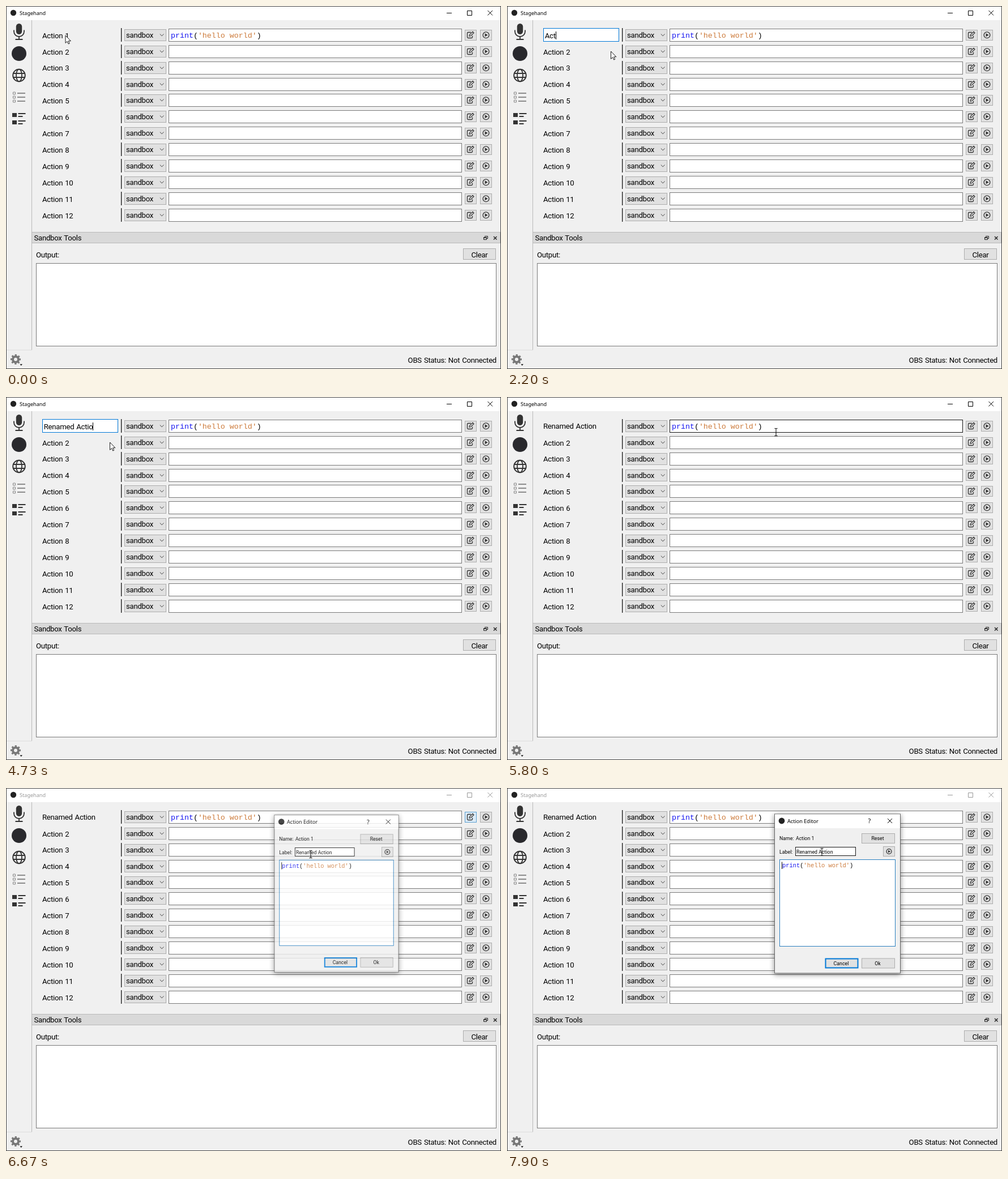
An HTML page that plays this animation: 874x641 px, repeating every 8000 ms.

```html
<!DOCTYPE html>
<html lang="en">
<head>
<meta charset="utf-8">
<title>Stagehand</title>
<style>
html, body { margin: 0; width: 100%; height: 100%; overflow: hidden; background: #f0f0f0; }
svg { display: block; width: 874px; height: 641px; }
text { white-space: pre; fill: #000; }
.ui { font: 13.2px Roboto, sans-serif; letter-spacing: -.28px; word-spacing: 1px; }
.bar { font: 9.1px "Noto Sans", sans-serif; }
.small { font: 8.8px Roboto, sans-serif; }
.code { font: 13.3px "Liberation Mono", monospace; }
.code.tiny { font-size: 10.45px; }
</style>
</head>
<body>
<svg id="stage" viewBox="0 0 874 641" xmlns="http://www.w3.org/2000/svg"></svg>
<script>
const LOOP = 8000, OPEN = 6590, CLICK = 6500, PITCH = 28.93;
const BLUE = '#0078d7', GREY = '#adadad', FIELD = '#7a7a7a', DARK = '#333';
const stage = document.getElementById('stage');

function add(parent, tag, attrs, content) {
  const el = document.createElementNS('http://www.w3.org/2000/svg', tag);
  for (const k in attrs) el.setAttribute(k, attrs[k]);
  if (content !== undefined) el.textContent = content;
  parent.appendChild(el);
  return el;
}
const set = (el, attrs) => { for (const k in attrs) el.setAttribute(k, attrs[k]); };
const show = (el, on) => el.setAttribute('visibility', on ? 'visible' : 'hidden');
const group = (p, attrs = {}) => add(p, 'g', attrs);
const label = (p, x, y, s, cls = 'ui', anchor = 'start') =>
  add(p, 'text', { x, y, class: cls, 'text-anchor': anchor }, s);
const line = (p, d, stroke = DARK, width = 1, fill = 'none') =>
  add(p, 'path', { d, stroke, 'stroke-width': width, fill });
const fill = (p, x, y, width, height, color) =>
  add(p, 'rect', { x, y, width, height, fill: color });
const disc = (p, cx, cy, r, color) => add(p, 'circle', { cx, cy, r, fill: color });
const ring = (p, cx, cy, r, stroke, width) =>
  add(p, 'circle', { cx, cy, r, fill: 'none', stroke, 'stroke-width': width });

// Outlined box given by its outer pixel edges
const box = (p, x0, y0, x1, y1, color, stroke, w = 1) => add(p, 'rect', {
  x: x0 + w / 2, y: y0 + w / 2, width: x1 - x0 - w, height: y1 - y0 - w,
  fill: color, stroke, 'stroke-width': w
});

// Things that react to the pointer
const items = [];
function control(p, kind, x0, y0, x1, y1, inDialog = false) {
  const isField = kind === 'field';
  const el = box(p, x0, y0, x1, y1, isField ? '#fff' : '#e1e1e1', isField ? FIELD : GREY);
  const item = { el, kind, x0, y0, x1, y1, inDialog };
  items.push(item);
  return item;
}

function code(p, x, y, cls) {
  const t = add(p, 'text', { x, y, class: cls });
  [['print', '#1414f0'], ['(', '#000'], ["'hello world'", '#cc7a3a'], [')', '#000']]
    .forEach(([s, c]) => add(t, 'tspan', { style: 'fill:' + c }, s));
}

function playIcon(p, x, y, r) {
  ring(p, x, y, r, DARK, 1.3);
  line(p, `M${x - r * .36} ${y - r * .55}L${x + r * .6} ${y}L${x - r * .36} ${y + r * .55}Z`, 'none', 0, DARK);
}

function editIcon(p, x, y) {
  line(p, `M${x + 1} ${y - 4.5}H${x - 4}Q${x - 5.5} ${y - 4.5} ${x - 5.5} ${y - 3}V${y + 4}Q${x - 5.5} ${y + 5.5} ${x - 4} ${y + 5.5}H${x + 2}Q${x + 3.5} ${y + 5.5} ${x + 3.5} ${y + 4}V${y + 1.5}`, DARK, 1.3);
  line(p, `M${x - 2} ${y + 2.2}L${x - 1.5} ${y - .3}L${x + 4} ${y - 5.6}L${x + 6} ${y - 3.6}L${x + .5} ${y + 1.8}Z`, DARK, 1.2, '#e8e8e8');
}

// Main window
fill(stage, 0, 0, 874, 641, '#f0f0f0');
fill(stage, 0, 0, 874, 25, '#fff');
disc(stage, 13, 12, 5.2, '#222');
const title = label(stage, 24, 15.5, 'Stagehand', 'bar');
const winButtons = line(stage, 'M778 12.5H787M814.5 8.5H822.5V16.5H814.5ZM850.5 8L859 16.5M859 8L850.5 16.5', '#000');
line(stage, 'M45.5 25V608', '#b9b9b9');
line(stage, 'M1 607.5H46', '#dcdcdc');

// Side bar
add(stage, 'rect', { x: 17.8, y: 31, width: 10.4, height: 19, rx: 5.2, fill: DARK });
line(stage, 'M14 42.5V45A9 9 0 0 0 32 45V42.5M23 54V59M16.5 59H29.5', DARK, 1.8);
disc(stage, 23, 84, 13, '#29292d');
ring(stage, 23, 122.5, 10.8, DARK, 1.9);
add(stage, 'ellipse', { cx: 23, cy: 122.5, rx: 5, ry: 10.8, fill: 'none', stroke: DARK, 'stroke-width': 1.8 });
line(stage, 'M12.5 119H33.5M12.5 126H33.5', DARK, 1.8);
for (let i = 0; i < 3; i++) {
  const y = 154 + i * 7;
  add(stage, 'rect', { x: 12.5, y: y - 2, width: 4, height: 4, rx: 1, fill: 'none', stroke: '#8c8c8c', 'stroke-width': 1.2 });
  line(stage, `M20 ${y}H34`, '#8c8c8c', 2);
}
for (const y of [189, 202]) {
  fill(stage, 11, y, 8, 7, DARK);
  line(stage, `M21.5 ${y + 1}H34.5M21.5 ${y + 6}H29.5`, DARK, 2.2);
}
const gear = ring(stage, 17, 624, 7.8, '#777', 2.6);
set(gear, { 'stroke-dasharray': 7.8 * Math.PI / 8, transform: 'rotate(-11 17 624)' });
ring(stage, 17, 624, 5, '#777', 4);
line(stage, 'M24.5 632.5H29L26.75 635Z', 'none', 0, '#000');

// Action rows
let firstLabel, editButton;
for (let i = 0; i < 12; i++) {
  const c = Math.round(50.75 + PITCH * i);
  const name = label(stage, 64, Math.round(56.6 + PITCH * i), 'Action ' + (i + 1));
  line(stage, `M203.7 ${c - 12}V${c + 12}`, '#000', 1.2);
  control(stage, 'button', 209, c - 10, 283, c + 11);
  label(stage, 212, c + 5, 'sandbox');
  line(stage, `M271.8 ${c - 1.5}L275.2 ${c + 1.8}L278.6 ${c - 1.5}`, '#444', 1);
  control(stage, 'field', 287, c - 11, 805, c + 12);
  const edit = control(stage, 'button', 810, c - 9, 831, c + 10);
  editIcon(stage, 820, c);
  control(stage, 'button', 837, c - 9, 858, c + 10);
  playIcon(stage, 847.5, c + .3, 5.4);
  if (!i) {
    firstLabel = name;
    editButton = edit;
    code(stage, 291, 55.5, 'code');
  }
}

// Output panel
box(stage, 45, 399, 873, 419, '#d9d9d9', '#b9b9b9');
label(stage, 49.5, 414, 'Sandbox Tools');
line(stage, 'M845.5 407.5V406.5H850.5V410.5H848.5M843.5 408.5H848.5V412.5H843.5ZM843.5 409.3H848.5', '#222');
line(stage, 'M861 407L866.5 412.5M866.5 407L861 412.5', '#222', 1.4);
label(stage, 53, 443.5, 'Output:');
box(stage, 807, 428, 865, 448, '#e1e1e1', GREY);
label(stage, 836, 443.5, 'Clear', 'ui', 'middle');
box(stage, 53, 454, 866, 601, '#fff', FIELD);
label(stage, 866, 630, 'OBS Status: Not Connected', 'ui', 'end');
box(stage, 0, 0, 874, 641, 'none', '#444');

// Inline rename box
const rename = group(stage);
const renameBox = box(rename, 64, 39, 198, 63, '#fff', BLUE);
const typed = label(rename, 66.7, 57, '');
const caret = fill(rename, 0, 45, 1, 14, '#000');

// Dialog
const dialog = group(stage);
const shell = box(dialog, 472, 45.5, 695, 327.5, '#f0f0f0', '#666');
shell.style.filter = 'drop-shadow(0 2px 5px rgba(0,0,0,.45))';
fill(dialog, 473, 46.5, 221, 24.5, '#fff');
disc(dialog, 485, 58, 5.4, '#222');
label(dialog, 495, 61.6, 'Action Editor', 'bar');
label(dialog, 640, 62, '?', 'bar', 'middle').style.fontSize = '11px';
line(dialog, 'M672 54L680 62M680 54L672 62', '#000');
label(dialog, 481, 92, 'Name:', 'small');
label(dialog, 510, 92, 'Action 1', 'small');
label(dialog, 481, 116, 'Label:', 'small');
control(dialog, 'field', 509, 104, 616, 120, true);
label(dialog, 511, 116, 'Renamed Action', 'small');
box(dialog, 664, 103, 685, 121, '#e1e1e1', GREY);
playIcon(dialog, 674.5, 112, 4.4);
const area = box(dialog, 481, 126, 686, 280, '#fff', '#2a7fbf');
items.push({ el: area, kind: 'area', x0: 481, y0: 126, x1: 686, y1: 280, inDialog: true });
code(dialog, 486, 140.3, 'code tiny');
const areaCaret = fill(dialog, 485, 130.5, 1, 12.5, '#000');
function dialogButton(x, y, s, main) {
  box(dialog, x, y, x + 59, y + 18, '#e1e1e1', main ? BLUE : GREY, main ? 2 : 1);
  label(dialog, x + 28.5, y + 12.2, s, 'small', 'middle');
}
dialogButton(626, 80, 'Reset');
dialogButton(561.5, 300.5, 'Cancel', true);
dialogButton(626, 300.5, 'Ok');

// Pointers
const arrow = line(stage, 'M0 0V13.4L3.1 10.5L5.2 15L7.2 14.1L5.2 9.8H9.4Z', '#000', .9, '#fff');
const beam = line(stage, 'M-2.5 -6.5H-.8L0 -6L.8 -6.5H2.5M0 -6V6M-2.5 6.5H-.8L0 6L.8 6.5H2.5', '#000', 1);

const PATH = [
  [30, 105, 52], [70, 99, 54], [680, 99, 54], [980, 183.5, 80], [5570, 183.5, 80],
  [6080, 862, 38], [6370, 823, 51.5], [CLICK, 823, 51.5], [6660, 538, 117],
  [6900, 552, 122], [7170, 576, 116], [7300, 576, 116], [7880, 556, 113]
];
function pointer(t) {
  let a = PATH[0];
  for (const b of PATH) {
    if (t < b[0]) {
      const u = Math.max(0, (t - a[0]) / (b[0] - a[0] || 1));
      const k = a === b ? 0 : u * u * (3 - 2 * u);
      return [a[1] + (b[1] - a[1]) * k, a[2] + (b[2] - a[2]) * k];
    }
    a = b;
  }
  return [a[1], a[2]];
}

const ERASE = [1400, 1770, 1930, 2070, 2200, 2370, 2470, 2630];
const TYPE = [2870, 3100, 3370, 3530, 3670, 3800, 3930, 4130, 4300, 4400, 4600, 4670, 4730, 4930];
const passed = (times, t) => times.filter(v => t >= v).length;

function render(t) {
  const [x, y] = pointer(t);
  const editing = t >= 470 && t < 5100;
  const open = t >= OPEN;

  // Renaming
  show(firstLabel, !editing);
  firstLabel.textContent = t < 5100 ? 'Action 1' : 'Renamed Action';
  firstLabel.setAttribute('y', t < 5100 ? 57 : 56);
  rename.setAttribute('display', editing ? 'inline' : 'none');
  if (editing) {
    const n = passed(TYPE, t);
    typed.textContent = n ? 'Renamed Action'.slice(0, n) : 'Action 1'.slice(0, 8 - passed(ERASE, t));
    renameBox.setAttribute('stroke', t < 700 ? '#171717' : BLUE);
    show(caret, t >= ERASE[0]);
    const w = typed.textContent ? typed.getComputedTextLength() : 0;
    caret.setAttribute('x', Math.round(66.6 + w));
  }

  // Hover
  let overText = t >= 500 && editing && x > 64 && x < 198 && y > 39 && y < 63;
  for (const it of items) {
    const over = it.inDialog === open && (open || t < CLICK) &&
      x >= it.x0 && x < it.x1 && y >= it.y0 && y < it.y1;
    if (over && it.kind !== 'button') overText = true;
    if (it.kind === 'button') set(it.el, { fill: over ? '#e5f1fb' : '#e1e1e1', stroke: over ? BLUE : GREY });
    if (it.kind === 'field') it.el.setAttribute('stroke', over ? '#171717' : FIELD);
  }
  if (t >= CLICK && t < 7000) {
    const pressed = t < 6570;
    set(editButton.el, { fill: pressed ? '#cce4f7' : '#dcebf7', stroke: pressed ? '#005499' : '#5a9fd0' });
  }

  // Dialog
  title.style.fill = open ? '#999' : '#000';
  winButtons.setAttribute('stroke', open ? '#999' : '#000');
  dialog.setAttribute('display', open ? 'inline' : 'none');
  if (open) {
    const p = 1 - Math.pow(1 - Math.min(1, (t - OPEN) / 180), 3);
    const s = .925 + .075 * p;
    set(dialog, { opacity: p, transform: `translate(583.5 186.5) scale(${s}) translate(-583.5 -186.5)` });
    show(areaCaret, t < 7170 || t >= 7700);
  }

  show(arrow, !overText);
  show(beam, overText);
  (overText ? beam : arrow).setAttribute('transform', `translate(${x} ${y})`);
}

const start = performance.now();
function tick() {
  render((performance.now() - start) % LOOP);
  requestAnimationFrame(tick);
}
tick();
</script>
</body>
</html>
```
